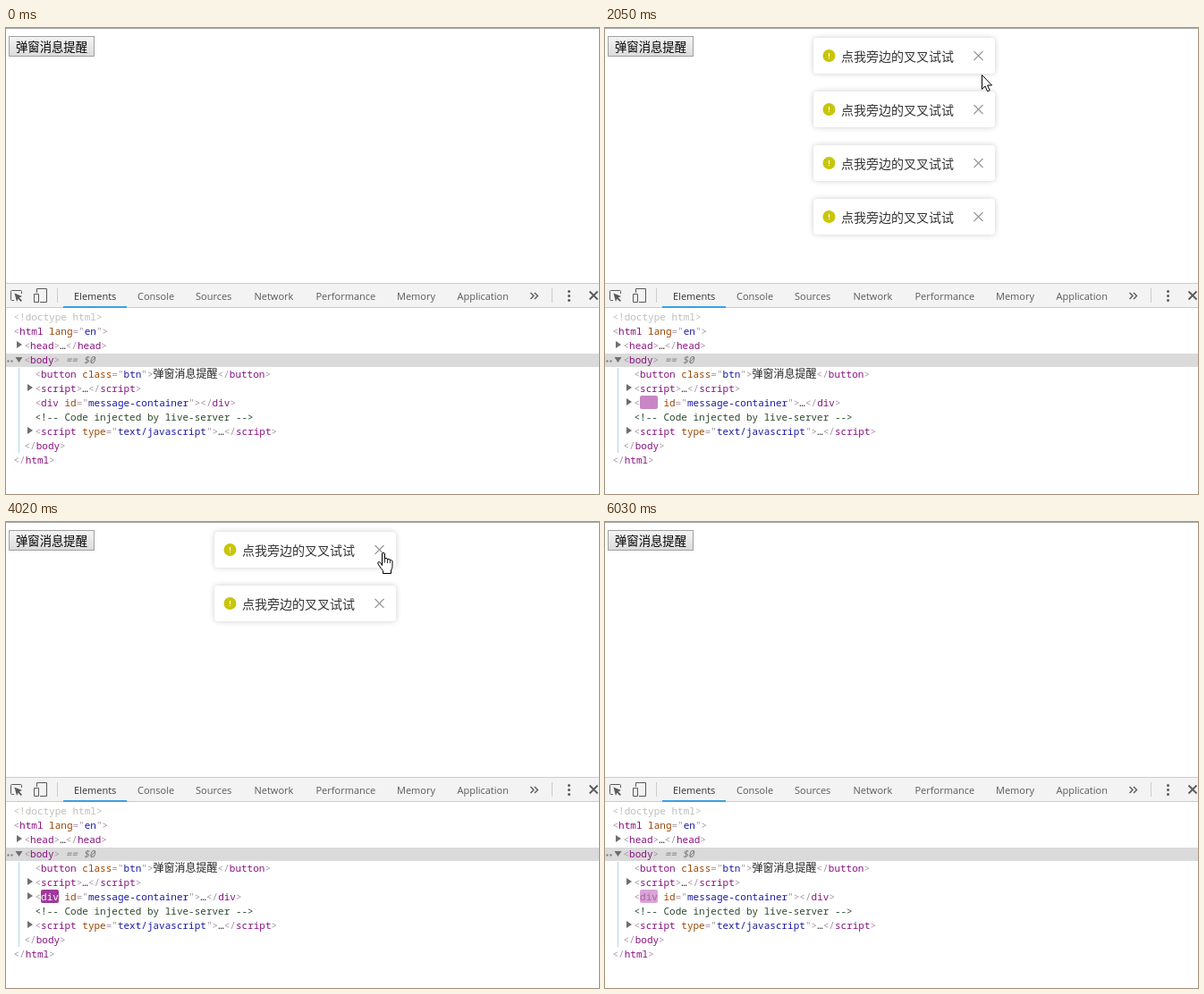
An HTML page for the animation above (6.15 s loop, 663 by 521 pixels).

```html
<!DOCTYPE html>
<html lang="zh-CN">
<head>
<meta charset="utf-8">
<style>
html, body { margin: 0; width: 100%; height: 100%; overflow: hidden; background: #fff; }
#stage { position: relative; width: 663px; height: 521px; overflow: hidden; }
#stage > *, .toast > * { position: absolute; white-space: pre; }
.cjk, .toast, #btn { font-family: "Noto Sans CJK SC", "Noto Sans CJK", sans-serif; }
#top { left: 0; top: 0; width: 663px; height: 1px; background: #a9a9a9; }
#btn { left: 3px; top: 9px; width: 94px; height: 21px; border: 1px solid #a0a0a0; font-size: 13.333px;
  line-height: 22px; text-align: center; color: #000; background: linear-gradient(#f4f4f4, #dcdcdc); }
#btn.hover { border-color: #707070; }
#btn.down { background: linear-gradient(#dcdcdc, #f0f0f0); }
#page { left: 0; top: 1px; width: 663px; height: 284px; overflow: hidden; }
.toast { position: absolute; left: 233px; top: 10px; width: 203px; height: 40px; border-radius: 4px;
  background: #fff; box-shadow: 0 0 6px rgba(0,0,0,.2); font-size: 14px; color: #333; }
.toast span { left: 31px; line-height: 41px; }
#bar { left: 0; top: 285px; width: 663px; height: 26px; background: #f3f3f3; border: solid #ccc; border-width: 1px 0; }
.tab { top: 290px; font: 11px/20px "Open Sans", "Noto Sans", sans-serif; color: #5a5a5a; }
.tab.on { color: #333; }
.line { font: 11px/16px "Noto Sans Mono", "DejaVu Sans Mono", monospace; color: #222; height: 16px; }
.line .cjk { font-size: 12px; line-height: 1; }
.line b, .line i { font-weight: normal; font-style: normal; }
.p { color: #a894a6; } .t { color: #881280; } .a { color: #994500; } .v { color: #1a1aa6; }
.flash { border-radius: 2px; }
#sel { left: 0; top: 364px; width: 663px; height: 15px; background: #dadada; }
#hover { left: 0; width: 663px; height: 16px; background: rgba(56,121,217,.1); }
</style>
</head>
<body>
<div id="stage">
  <div id="btn">弹窗消息提醒</div>
  <div id="page"></div>
  <div id="top"></div>
  <div id="bar"></div>
  <div id="sel"></div>
  <div id="hover"></div>
  <svg width="663" height="521" style="left:0;top:0" fill="none" stroke="#5a5a5a">
    <path d="M57.5 291v16M610.5 291v16" stroke="#ccc"/>
    <path d="M64 312h71" stroke="#3b9fe2" stroke-width="2"/>
    <path d="M9 304.5H6.500Q5.500 304.500 5.500 303.500V294.500Q5.500 293.500 6.500 293.500H16.500Q17.500 293.500 17.500 294.500V297"/>
    <path d="M9.500 296.500L18 300L14.800 301.500L18 304.800L16.700 306L13.500 302.800L12 306Z" fill="#5a5a5a" stroke="none"/>
    <path d="M34.500 296V291.500H45.500V306.500H38M31.500 297.500H36.500V306.500H31.500Z"/>
    <path d="M586.500 296l3.500 3.500-3.500 3.500M591 296l3.500 3.500-3.500 3.500" stroke-width="1.4"/>
    <path d="M629.500 294.500h.01M629.500 299.500h.01M629.500 304.500h.01" stroke-width="3" stroke-linecap="round"/>
    <path d="M652.500 294.500l9 9M661.500 294.500l-9 9" stroke-width="1.8"/>
    <path d="M14.500 380v95" stroke="#b5d3e7"/>
    <path d="M1.500 372.500h2M5.500 372.500h2" stroke="#777" stroke-width="2"/>
    <g fill="#6e6e6e" stroke="none">
      <path d="M12 350l6 4-6 4zM24 398l6 4-6 4zM24 446l6 4-6 4zM10.500 368h8l-4 6z"/>
      <path id="arrow" d="M24 414l6 4-6 4z"/>
    </g>
  </svg>
  <svg id="cursor" width="20" height="26" fill="#fff" stroke="#000" stroke-linejoin="round" style="left:0;top:0">
    <path id="pointer" d="M.5.5V16.500L4 13L6.600 18.800L9.200 17.700L6.600 12H11.500Z"/>
    <g id="hand">
      <path d="M5.500 14.500V2Q5.500.5 7 .5T8.500 2V7.500Q8.500 6.500 10 6.500T11.500 8Q11.500 7.500 13 7.500T14.500 9Q14.500 8.500 15.500 8.500T17 10V15.500Q17 17.500 15.500 20V23.500H6.500V20.500Q4 17.500 1 13Q.2 11 2 10.500Q3.500 10.500 5.500 14.500Z"/>
      <path d="M8.500 7.500v4M11.500 8v4M14.500 9v3" fill="none" stroke-width=".8"/>
    </g>
  </svg>
</div>
<script>
const LOOP = 6150, FADE = 300, COLLAPSE = 200;
const opens = [800, 1110, 1420, 1730];
const closes = [2600, 3485, 4175, 5090];
const mutations = [...opens, ...closes.map(c => c + FADE + COLLAPSE)];
// time, x, y of the pointer tip
const path = [[90, 230, 440], [560, 68, 25], [1790, 68, 25], [2050, 421, 52],
  [2330, 421, 35], [5400, 421, 35], [5800, 434, 530]];

const $ = id => document.getElementById(id);
const stage = $('stage');
const clamp = v => Math.max(0, Math.min(1, v));
const mix = (a, b, p) => a + (b - a) * p;
const smooth = p => p * p * (3 - 2 * p);

function bezier(x1, y1, x2, y2) {
  const at = (a, b, s) => 3 * a * s * (1 - s) ** 2 + 3 * b * s * s * (1 - s) + s ** 3;
  return x => {
    if (x <= 0 || x >= 1) return clamp(x);
    let lo = 0, hi = 1;
    for (let i = 0; i < 20; i++) {
      const mid = (lo + hi) / 2;
      if (at(x1, x2, mid) < x) lo = mid; else hi = mid;
    }
    return at(y1, y2, lo);
  };
}
const ease = bezier(.25, .1, .25, 1), easeInOut = bezier(.42, 0, .58, 1);

function add(parent, cls, html, x, y) {
  const el = document.createElement('div');
  el.className = cls;
  el.innerHTML = html;
  if (x !== undefined) el.style.left = x + 'px';
  if (y !== undefined) el.style.top = y + 'px';
  parent.insertBefore(el, parent === stage ? $('cursor') : null);
  return el;
}

const span = (cls, s) => `<b class="${cls}">${s.replace('<', '&lt;')}</b>`;
const paint = code => code.replace(/(<\/?)(\w+)|( \w+)="([^"]*)"|>|[\u4e00-\u9fff]+|…/g,
  (all, open, tag, attr, value) =>
    tag ? span('p', open) + span('t', tag) :
    attr ? span('a', attr) + span('p', '="') + span('v', value) + span('p', '"') :
    all === '>' ? span('p', all) :
    all === '…' ? '<i>…</i>' : span('cjk', all));

[['Elements', 76], ['Console', 147], ['Sources', 212], ['Network', 277.500], ['Performance', 346.500],
  ['Memory', 437], ['Application', 504.500]].forEach(([name, x], i) => add(stage, i ? 'tab' : 'tab on', name, x));

const rows = [
  [9, '<b style="color:#bdbfb8">&lt;!doctype html&gt;</b>'],
  [9, paint('<html lang="en">')],
  [21, paint('<head>…</head>')],
  [21, paint('<body>') + '<em style="color:#777"> == $0</em>'],
  [33, paint('<button class="btn">弹窗消息提醒</button>')],
  [33, paint('<script>…<\/script>')],
  [33, paint('<div id="message-container">…</div>')],
  [33, '<b style="color:#2c4a2e">&lt;!-- Code injected by live-server --&gt;</b>'],
  [33, paint('<script type="text/javascript">…<\/script>')],
  [21, paint('</body>')],
  [9, paint('</html>')]
].map(([x, html], i) => add(stage, 'line', html, x - .5, 315 + 16 * i));
const flash = rows[6].querySelector('.t'), dots = rows[6].querySelector('i');
flash.classList.add('flash');

const toasts = opens.map(() => add($('page'), 'toast', `<span>点我旁边的叉叉试试</span>
<svg width="203" height="40" style="left:0;top:0" fill="none">
<circle cx="17.500" cy="20" r="7" fill="#c8c60a"/>
<path d="M17.500 17v4M17.500 22v1.200" stroke="#fff"/>
<path d="M179.500 15l10 10M189.500 15l-10 10" stroke="#999" stroke-width="1.200"/></svg>`));

function pointer(t) {
  let i = 0;
  while (i < path.length - 2 && t > path[i + 1][0]) i++;
  const [t0, x0, y0] = path[i], [t1, x1, y1] = path[i + 1];
  const p = smooth(clamp((t - t0) / (t1 - t0)));
  return [mix(x0, x1, p), mix(y0, y1, p)];
}

const rgb = (a, b, p) => `rgb(${a.map((v, i) => Math.round(mix(v, b[i], p)))})`;

function drawToasts(t) {
  let y = 0;
  toasts.forEach((el, i) => {
    const shown = easeInOut(clamp((t - opens[i]) / FADE));
    const gone = easeInOut(clamp((t - closes[i]) / FADE));
    el.style.opacity = shown * (1 - gone);
    el.style.transform = `translateY(${y - 40 * (1 - shown + gone)}px)`;
    y += 60 * (1 - easeInOut(clamp((t - closes[i] - FADE) / COLLAPSE)));
  });
}

function drawFlash(t) {
  const filled = t >= mutations[0] && t < mutations[7];
  dots.textContent = filled ? '…' : '';
  $('arrow').style.display = filled ? '' : 'none';
  const last = mutations.filter(m => m <= t).pop();
  const age = last === undefined ? 1 : (t - last) / 1400;
  const p = ease(clamp(age / .8)), out = ease(clamp((age - .8) / .2));
  flash.style.color = rgb([255, 255, 255], [136, 18, 128], p);
  flash.style.background = age >= 1 ? 'none' :
    age > .8 ? `rgba(245,219,244,${1 - out})` : rgb([158, 54, 153], [245, 219, 244], p);
}

function drawPointer(t) {
  const visible = t >= 90 && t < 5800, [x, y] = pointer(t);
  const onClose = x > 400 && y < 48;
  $('cursor').style.display = visible ? '' : 'none';
  $('cursor').style.transform = `translate(${Math.round(x) - (onClose ? 6 : 0)}px,${Math.round(y) - (onClose ? 1 : 0)}px)`;
  $('pointer').style.display = onClose ? 'none' : '';
  $('hand').style.display = onClose ? '' : 'none';
  const row = Math.floor((y - 315) / 16);
  $('hover').style.display = visible && row >= 0 && row < rows.length ? '' : 'none';
  $('hover').style.top = 315 + 16 * row + 'px';
  $('btn').classList.toggle('hover', visible && x < 99 && y > 9 && y < 32);
  $('btn').classList.toggle('down', opens.some(o => t >= o - 30 && t < o));
}

function frame() {
  const t = performance.now() % LOOP;
  drawToasts(t);
  drawFlash(t);
  drawPointer(t);
  requestAnimationFrame(frame);
}
frame();
</script>
</body>
</html>
```
